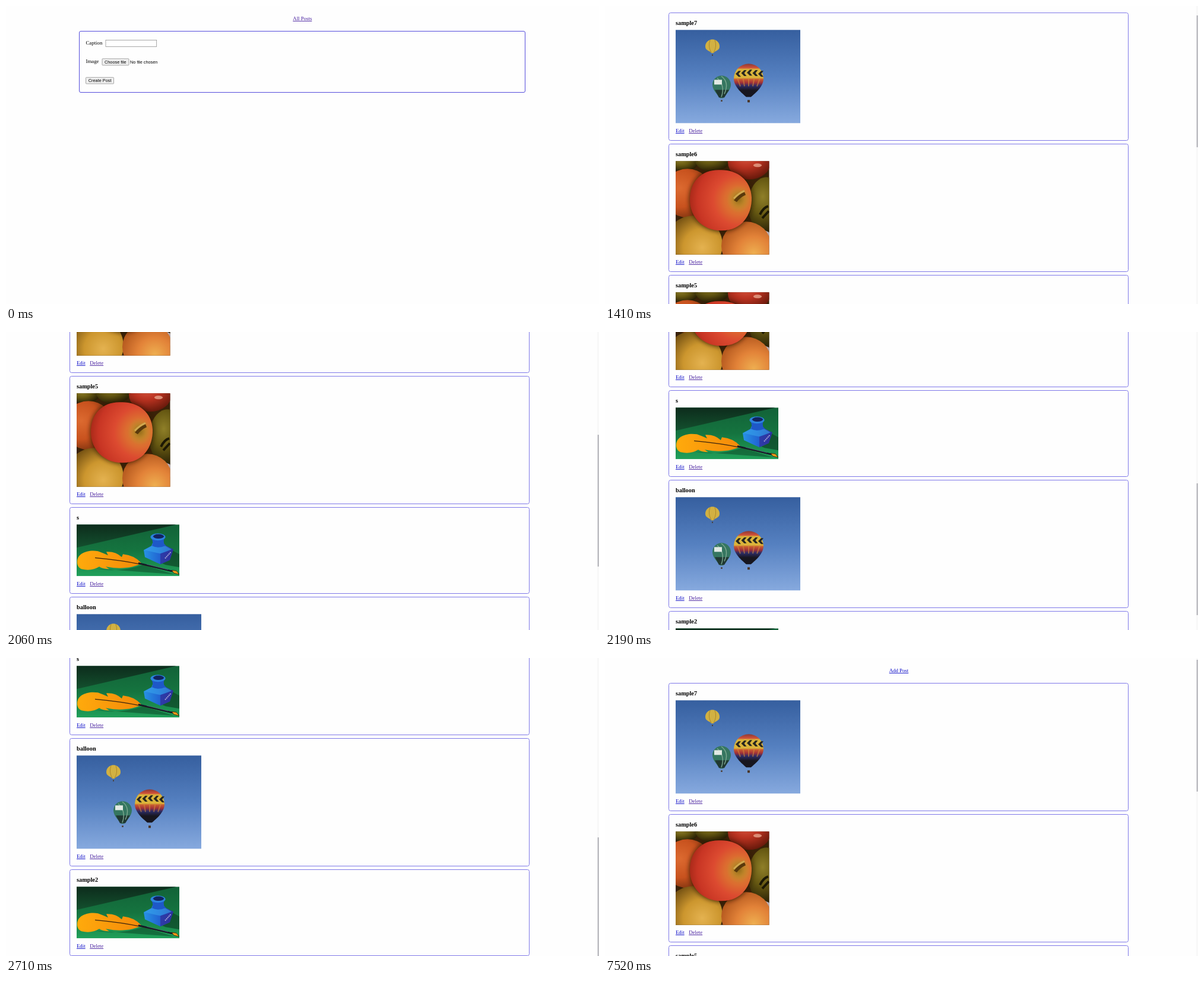
Recreate the animation shown at these times as an HTML page. Size 999 px wide and 502 px high, loop 8000 ms.

```html
<!DOCTYPE html>
<html lang="en">
<head>
<meta charset="utf-8">
<title>Posts</title>
<style>
  html, body { margin: 0; width: 100%; height: 100%; overflow: hidden; background: #fefefe; }
  svg { display: block; width: 999px; height: 502px; }
  text { font: 8.8px "Liberation Serif", "Times New Roman", serif; white-space: pre; }
  .title { font-size: 10.3px; font-weight: bold; }
  .link { text-decoration: underline; fill: #0808c8; }
  .visited { fill: #431a9c; }
  .middle { text-anchor: middle; }
  .control { font: 7.33px "Liberation Sans", Arial, sans-serif; }
  .card { fill: none; stroke: #7e78e8; }
  #form .card { stroke: #544cdc; }
  .field { fill: #fff; stroke: #858585; stroke-width: .7; }
  .button { fill: #efefef; stroke: #858585; stroke-width: .7; }
</style>
</head>
<body>
<svg viewBox="0 0 999 502">
  <defs>
    <linearGradient id="sky" x2="0" y2="1">
      <stop stop-color="#365f9f"/><stop offset=".5" stop-color="#5580c0"/><stop offset="1" stop-color="#86a9de"/>
    </linearGradient>
    <linearGradient id="stripes" x2="0" y2="1">
      <stop stop-color="#8c3a35"/><stop offset=".12" stop-color="#d0503a"/>
      <stop offset=".17" stop-color="#d9b53c"/><stop offset=".42" stop-color="#dcb43a"/>
      <stop offset=".47" stop-color="#c85a30"/><stop offset=".57" stop-color="#a03038"/>
      <stop offset=".66" stop-color="#2c2c66"/><stop offset=".8" stop-color="#17161f"/>
    </linearGradient>
    <radialGradient id="apple" cx=".8" cy=".5" r=".85">
      <stop stop-color="#cf8a2c"/><stop offset=".28" stop-color="#dc6c30"/>
      <stop offset=".5" stop-color="#dc4a30"/><stop offset=".8" stop-color="#c83524"/><stop offset="1" stop-color="#a02616"/>
    </radialGradient>
    <radialGradient id="red" cx=".42" cy=".3" r=".7">
      <stop stop-color="#dc5a42"/><stop offset=".5" stop-color="#b83220"/><stop offset="1" stop-color="#6a1a0c"/>
    </radialGradient>
    <radialGradient id="orange" cx=".35" cy=".4" r=".65">
      <stop stop-color="#dc6a30"/><stop offset=".6" stop-color="#c8521e"/><stop offset="1" stop-color="#7e3410"/>
    </radialGradient>
    <radialGradient id="peach" cx=".65" cy=".65" r=".7">
      <stop stop-color="#eeae50"/><stop offset=".5" stop-color="#e28238"/><stop offset="1" stop-color="#b4581e"/>
    </radialGradient>
    <radialGradient id="yellow" cx=".65" cy=".55" r=".65">
      <stop stop-color="#e4b250"/><stop offset=".5" stop-color="#cc962e"/><stop offset="1" stop-color="#6e4c10"/>
    </radialGradient>
    <radialGradient id="olive" cx=".4" cy=".35" r=".65">
      <stop stop-color="#8f7f28"/><stop offset=".5" stop-color="#665812"/><stop offset="1" stop-color="#2a2206"/>
    </radialGradient>
    <radialGradient id="hollow">
      <stop stop-color="#8e6a18"/><stop offset=".5" stop-color="#b98428" stop-opacity=".8"/><stop offset="1" stop-color="#cc8a30" stop-opacity="0"/>
    </radialGradient>
    <linearGradient id="desk" x2="0" y2="1">
      <stop stop-color="#126238"/><stop offset=".5" stop-color="#15743f"/><stop offset="1" stop-color="#20a05a"/>
    </linearGradient>
    <linearGradient id="shade" x2="0" y2="1">
      <stop stop-color="#0d2c1c"/><stop offset="1" stop-color="#13502e"/>
    </linearGradient>
    <linearGradient id="glass" x2="1">
      <stop stop-color="#2793e4"/><stop offset=".5" stop-color="#2267d4"/><stop offset="1" stop-color="#2a2f9c"/>
    </linearGradient>
    <linearGradient id="plume" x2="1">
      <stop stop-color="#ffaa0c"/><stop offset="1" stop-color="#f58a0a"/>
    </linearGradient>
    <filter id="soft"><feGaussianBlur stdDeviation="3"/></filter>
    <clipPath id="square"><path d="M0 0H157.5V157.5H0Z"/></clipPath>
    <clipPath id="wide"><path d="M0 0H173V87H0Z"/></clipPath>

    <g id="balloons"></g>

    <g id="apples" clip-path="url(#square)">
      <path d="M0 0H158V158H0Z" fill="#3a2208"/>
      <ellipse cx="14" cy="2" rx="24" ry="15" fill="url(#olive)"/>
      <ellipse cx="62" cy="-4" rx="30" ry="22" fill="url(#olive)"/>
      <ellipse cx="124" cy="2" rx="36" ry="29" fill="url(#red)"/>
      <ellipse cx="138" cy="7" rx="7" ry="3" fill="#f0b49a" opacity=".7"/>
      <ellipse cx="20" cy="54" rx="42" ry="41" fill="url(#orange)"/>
      <ellipse cx="153" cy="74" rx="31" ry="47" fill="url(#olive)"/>
      <path d="M142 90Q148 78 156 76M146 96L157 84" fill="none" stroke="#1c1804" stroke-width="4"/>
      <path d="M148 116l10 4v22z" fill="#b9adb7"/>
      <circle cx="30" cy="141" r="49" fill="url(#yellow)"/>
      <ellipse cx="119" cy="143" rx="42" ry="41" fill="url(#peach)"/>
      <path id="fruit" d="M24 65C24 35 43 15 72 15C102 13 127 31 128 61C129 91 111 117 78 117C48 118 24 96 24 65Z" fill="#2c1404" opacity=".6" filter="url(#soft)" stroke="#2c1404" stroke-width="4"/>
      <path d="M24 65C24 35 43 15 72 15C102 13 127 31 128 61C129 91 111 117 78 117C48 118 24 96 24 65Z" fill="url(#apple)"/>
      <ellipse cx="106" cy="64" rx="20" ry="23" fill="url(#hollow)"/>
      <path d="M98 66Q106 56 116 52L118 57Q109 61 103 69Z" fill="#5a390c"/>
      <path d="M98 63Q106 54 116 50" fill="none" stroke="#d0a850" stroke-width="3"/>
    </g>

    <g id="quill" clip-path="url(#wide)">
      <path d="M0 0H173V87H0Z" fill="url(#desk)"/>
      <path d="M0 0H168L0 39Z" fill="url(#shade)"/>
      <path d="M118 55L150 68L173 72V50L160 43Z" fill="#0d4326" opacity=".7"/>
      <path d="M30 74Q70 82 112 68L165 84Q110 80 30 74Z" fill="#0e4d2b" opacity=".55"/>
      <path d="M1 66C-1 49 18 42 36 45Q47 49 53 52L50 46Q66 45 76 55L78 50Q98 52 109 65Q94 75 62 73L49 71Q53 74 55 75Q44 75 38 71Q25 79 8 75Q2 72 1 66Z" fill="url(#plume)"/>
      <path d="M31 56Q75 60 108 67L160 79" fill="none" stroke="#39240e" stroke-width="1.2"/>
      <path d="M104 65L162 79" stroke="#141b28" stroke-width="2.6"/>
      <path d="M118 67L154 76" stroke="#596980" stroke-width=".7"/>
      <path d="M160 77L168 78L173 84L164 82Z" fill="#f09a18" stroke="#2c1a08" stroke-width=".8"/>
      <path d="M128 31L146 31L151 36L163 42L157 60L141 67L115 55L113 43L126 36Z" fill="url(#glass)"/>
      <path d="M114 43L127 36L149 36L160 42L141 49Z" fill="#38a2ec" opacity=".6"/>
      <path d="M141 49L161 43L157 60L141 67Z" fill="#30319c" opacity=".75"/>
      <path d="M149 57L159 46" stroke="#a8a4d8" stroke-width="2" stroke-dasharray="2 1"/>
      <path d="M126 23Q130 30 127 36Q137 41 149 36Q145 29 148 23Z" fill="#1e58c8"/>
      <ellipse cx="137" cy="21" rx="12.5" ry="6" fill="#2b83df"/>
      <ellipse cx="138" cy="20" rx="9" ry="3.7" fill="#12235f"/>
    </g>
  </defs>

  <g id="form">
    <text class="link visited middle" x="499.3" y="24">All Posts</text>
    <rect class="card" x="123.5" y="42.5" width="751" height="103" rx="2.5"/>
    <text x="134.5" y="65">Caption</text>
    <rect class="field" x="168" y="57.5" width="85.7" height="11"/>
    <text x="134.5" y="96.3">Image</text>
    <rect class="button" x="162" y="88.8" width="45" height="11" rx="1"/>
    <text class="control" x="166" y="97">Choose file</text>
    <text class="control" x="209" y="97">No file chosen</text>
    <rect class="button" x="134.5" y="120.3" width="47" height="10.7" rx="1"/>
    <text class="control" x="138.8" y="128.2">Create Post</text>
  </g>
  <g id="list">
    <g id="page"><text class="link middle" x="495" y="24">Add Post</text></g>
    <rect x="996" width="3" height="502" fill="#f8f8f8"/>
    <rect id="thumb" x="996.5" width="2.5" height="222" fill="#bdbdc2"/>
  </g>
</svg>
<script>
const byId = id => document.getElementById(id);

// Round envelope tapering to a narrow mouth, with a basket below.
function balloon(cx, top, r, mouth, fill) {
  const mid = top + r, neck = r * .16, low = mid + r * .6;
  return `<path d="M${cx - r} ${mid}A${r} ${r} 0 0 1 ${cx + r} ${mid}
    C${cx + r} ${low} ${cx + neck * 2} ${mouth - 4} ${cx + neck} ${mouth}H${cx - neck}
    C${cx - neck * 2} ${mouth - 4} ${cx - r} ${low} ${cx - r} ${mid}Z" fill="${fill}"/>
    <rect x="${cx - r * .08}" y="${mouth + r * .2}" width="${r * .16}" height="${r * .16}" fill="#4a3525"/>`;
}

function drawBalloons() {
  let chevrons = '', ribs = '';
  for (let i = 0; i < 5; i++) {
    const x = 101 + i * 9.5, y = 74 - 2 * Math.sin(i * Math.PI / 4);
    chevrons += `M${x} ${y}l5 -5h4l-4 5l4 5h-4z`;
    ribs += `M${104 + i * 9.5} 81L${109 + i * 7} 95`;
  }
  byId('balloons').innerHTML = `<rect width="210" height="157" fill="url(#sky)"/>
    ${balloon(62, 16, 12, 39, '#d2b142')}
    <path d="M58 17Q54 28 60 38M66 17Q70 28 64 38" fill="none" stroke="#a37d25" stroke-width=".8"/>
    ${balloon(77.5, 77, 15.5, 115, '#357660')}
    <path d="M66 101L73 114H82L90 101Z" fill="#203832"/>
    <path d="M77 78Q91 88 82 108M70 81Q84 94 77 113" fill="none" stroke="#7ca88f" stroke-width="1.4"/>
    <rect x="65" y="84" width="13" height="8" fill="#e1e9e3"/>
    ${balloon(123, 57, 25, 113, 'url(#stripes)')}
    <path d="${chevrons}" fill="#28271f"/>
    <path d="${ribs}" stroke="#d08a38" stroke-width="2" opacity=".6"/>`;
}

const pictureHeights = { balloons: 157, apples: 157, quill: 87 };
const posts = [
  ['sample7', 'balloons', 42.5], ['sample6', 'apples', 263.5], ['sample5', 'apples', 484.5],
  ['s', 'quill', 705.5], ['balloon', 'balloons', 856.5], ['sample2', 'quill', 1077.5],
];

function postCard([title, picture, top]) {
  const height = pictureHeights[picture];
  return `<g transform="translate(107.5 ${top})">
    <rect class="card" width="774" height="${height + 58}" rx="3"/>
    <text class="title" x="11.5" y="20.5">${title}</text>
    <use href="#${picture}" x="11.5" y="28.8"/>
    <text class="link" x="11.5" y="${height + 44.5}">Edit</text>
    <text class="link visited" x="33.7" y="${height + 44.5}">Delete</text></g>`;
}

drawBalloons();
byId('page').innerHTML += posts.map(postCard).join('');

// [start in ms, scroll offset]; the form shows before the first entry.
const scrollSteps = [
  [500, 0], [1410, 31], [1540, 140], [1670, 240], [2060, 410], [2190, 607],
  [2580, 690], [2710, 721], [7260, 680], [7390, 300], [7520, 0],
];

function render(now) {
  const time = now % 8000;
  const step = scrollSteps.findLast(([start]) => time >= start);
  byId('form').style.display = step ? 'none' : '';
  byId('list').style.display = step ? '' : 'none';
  const scroll = step ? step[1] : 0;
  byId('page').setAttribute('transform', `translate(0 ${-scroll})`);
  byId('thumb').setAttribute('y', 3 + scroll * .415);
  requestAnimationFrame(render);
}
render(performance.now());
</script>
</body>
</html>
```
